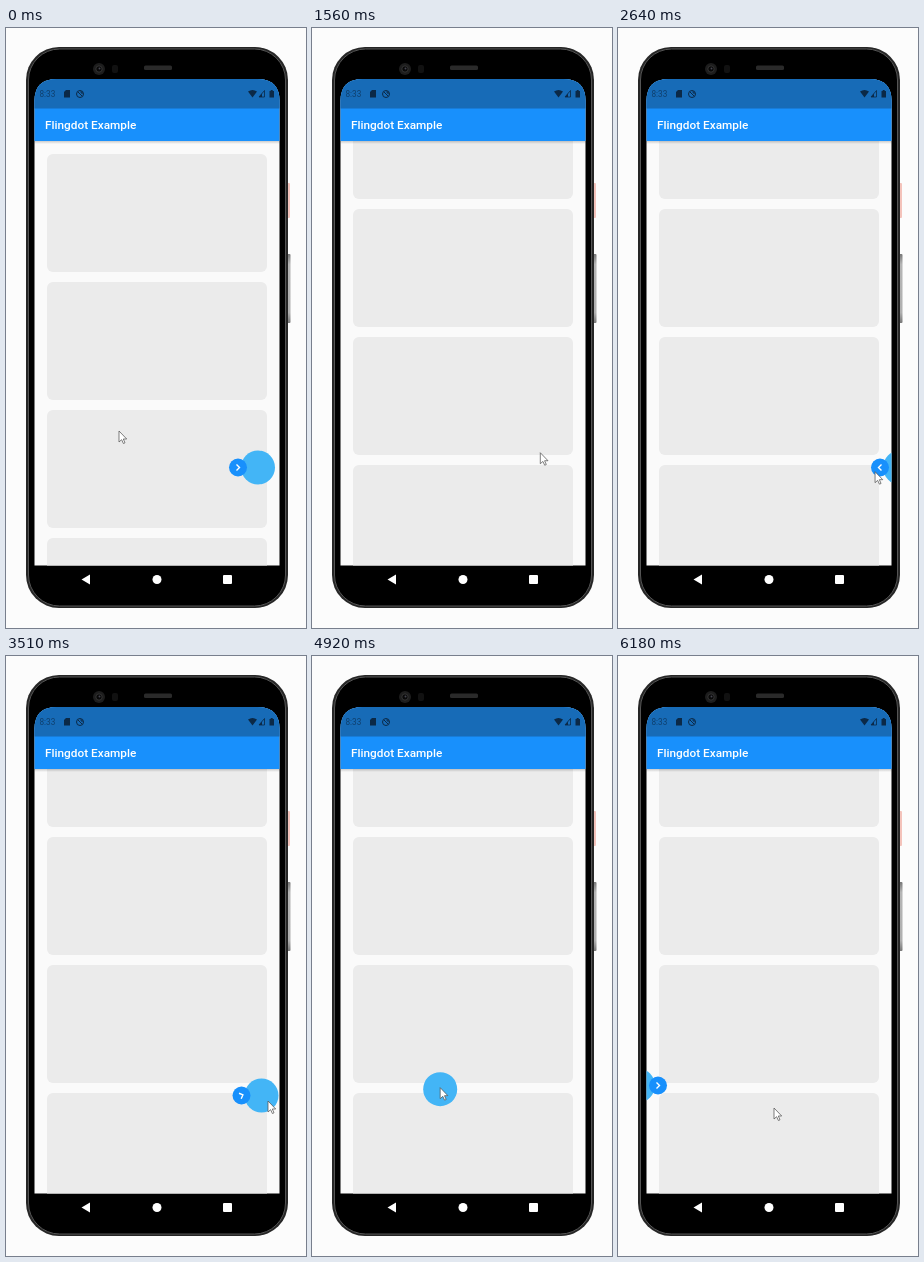
An HTML page for the animation above (6270 ms loop, 300x600 px).

```html
<!DOCTYPE html>
<html lang="en">
<head>
<meta charset="utf-8">
<title>Draggable ball demo</title>
<style>
html, body { margin: 0; width: 100%; height: 100%; overflow: hidden; background: #fcfcfc; }
svg { display: block; width: 300px; height: 600px; }
text { font-family: Roboto, "Open Sans", sans-serif; }
</style>
</head>
<body>
<svg viewBox="0 0 300 600">
  <defs>
    <clipPath id="screen"><path d="M28.500 537.500V73Q28.500 51 51 51H251Q273.500 51 273.500 73V537.500Z"/></clipPath>
    <linearGradient id="shade" x2="0" y2="1">
      <stop offset="0" stop-color="#000" stop-opacity=".22"/>
      <stop offset="1" stop-color="#000" stop-opacity="0"/>
    </linearGradient>
    <linearGradient id="volume" x2="0" y2="1">
      <stop offset="0" stop-color="#777"/>
      <stop offset=".15" stop-color="#b5b5b5"/>
      <stop offset=".85" stop-color="#b0b0b0"/>
      <stop offset="1" stop-color="#777"/>
    </linearGradient>
  </defs>

  <!-- phone body -->
  <rect x="280" y="155" width="4" height="35" rx="1" fill="#f4c3bb"/>
  <rect x="280" y="226" width="4.5" height="69" rx="1" fill="url(#volume)"/>
  <rect x="20" y="19" width="262" height="561" rx="33" fill="#262626"/>
  <rect x="22.5" y="21" width="257" height="557" rx="31" fill="#000" stroke="#555"/>
  <rect x="138" y="37.5" width="28" height="4.5" rx="1.5" fill="#2a2a2a"/>
  <circle cx="93" cy="41" r="6" fill="#1d1d1d"/>
  <circle cx="93" cy="41" r="3.2" fill="#090909" stroke="#343434"/>
  <circle cx="93.5" cy="40.5" r="1" fill="#454550"/>
  <rect x="106" y="37" width="6" height="8" rx="2" fill="#111"/>

  <g clip-path="url(#screen)">
    <rect x="28" y="51" width="246" height="487" fill="#fafafa"/>
    <g id="cards" fill="#ebebeb"></g>
    <rect x="28" y="112.5" width="246" height="3.5" fill="url(#shade)"/>
    <rect x="28" y="51" width="246" height="62" fill="#1890fc"/>
    <rect x="28" y="51" width="246" height="29.500" fill="#176bb7"/>
    <text x="39" y="101" font-size="11.8" font-weight="500" fill="#fff">Flingdot Example</text>

    <!-- status icons -->
    <g fill="#0b2947">
      <text x="33.5" y="69" font-size="8.2" fill="#0f3f6d">8:33</text>
      <path d="M60 62H64V69.5H58V64Z"/>
      <circle cx="74" cy="66" r="3.5" fill="none" stroke="#0b2947"/>
      <path d="M72 64L76 68M74.3 64H76V66" fill="none" stroke="#0b2947"/>
      <path d="M242 63.5Q246.500 60.500 251 63.500L246.500 69.500Z"/>
      <path d="M253 69H258.500V62.500Z" fill="none" stroke="#0b2947" stroke-width=".8"/>
      <path d="M253 69H256V65.500Z"/>
      <path d="M263.500 63H264.700V62H266.700V63H268V69.500H263.500Z"/>
    </g>

    <g id="ball">
      <circle r="17" fill="#43b5f6"/>
      <g id="button">
        <circle r="9" fill="#1890fc"/>
        <path id="chevron" d="M-1.500 -3L1.500 0L-1.500 3" fill="none" stroke="#fff" stroke-width="1.400"/>
      </g>
    </g>
  </g>

  <!-- navigation bar -->
  <g fill="#fff">
    <path d="M84 546.500V556.500L75.500 551.500Z"/>
    <circle cx="151" cy="551.500" r="4.500"/>
    <rect x="217" y="547" width="9" height="9" rx="1"/>
  </g>

  <path id="cursor" d="M0 0V11L2.600 8.700L4.400 12.500L6 11.800L4.300 8H7.700Z" fill="#fff" stroke="#555" stroke-width=".75" stroke-linejoin="round"/>
</svg>
<script>
const LOOP = 6270;
const el = id => document.getElementById(id);
const place = (node, value) => node.setAttribute('transform', value);

const smooth = u => u * u * (3 - 2 * u);
const easeOut = u => 1 - (1 - u) ** 3;
const glide = (t, from, to, ease = smooth) =>
  ease(Math.min(1, Math.max(0, (t - from) / (to - from))));

// Position after a chain of moves, each { from, to, x, y, ease }.
const follow = (t, x, y, moves) => moves.reduce((p, m) => {
  const k = glide(t, m.from, m.to, m.ease);
  return { x: p.x + (m.x - p.x) * k, y: p.y + (m.y - p.y) * k };
}, { x, y });

const swipe = { from: 445, to: 830 };
const drags = [
  { from: 3900, to: 4260, x: 141, y: 432 },
  { from: 4800, to: 5250, x: 69, y: 430 }
];
const cursorMoves = [
  { ...swipe, x: 157, y: 188 },
  { from: 1200, to: 1770, x: 232, y: 437, ease: easeOut },
  { from: 2370, to: 2970, x: 262, y: 445, ease: easeOut },
  { from: 3570, to: 3870, x: 252, y: 438 },
  ...drags,
  { from: 5880, to: 6180, x: 156, y: 452 }
];
// The ball hangs just below the pointer, then snaps to the left side.
const GRIP = 1.5;
const ballMoves = [
  ...drags.map(m => ({ ...m, y: m.y + GRIP })),
  { from: 5250, to: 5400, x: 50, y: 429.5, ease: easeOut }
];

for (let i = 0; i < 6; i++) {
  el('cards').insertAdjacentHTML('beforeend',
    `<rect x="41" y="${126 + 128 * i}" width="220" height="118" rx="6"/>`);
}

function draw(t) {
  const onLeft = t > 4500;
  const tuckRight = glide(t, 2400, 2620);
  const untuck = glide(t, 3330, 3560);
  const tuckLeft = glide(t, 5900, 6150);

  const cursor = follow(t, 113, 403, cursorMoves);
  const ball = follow(t, 252, 439.5, ballMoves);
  const ballX = ball.x + 30 * (tuckRight - untuck - tuckLeft);
  const ballSize = 1 - glide(t, 570, 780) + glide(t, 1890, 2200);
  const buttonSize = 1 - glide(t, 3900, 4000) + glide(t, 5430, 5570);
  const turns = tuckRight + untuck + tuckLeft + (onLeft ? 1 : 0);

  place(el('cards'), `translate(0 ${-201 * glide(t, swipe.from, swipe.to)})`);
  place(el('ball'), `translate(${ballX} ${ball.y}) scale(${ballSize})`);
  place(el('button'), `translate(${onLeft ? 20 : -20} 0) scale(${buttonSize})`);
  place(el('chevron'), `rotate(${180 * turns})`);
  place(el('cursor'), `translate(${cursor.x} ${cursor.y})`);
}

const start = performance.now();
function tick() {
  draw((performance.now() - start) % LOOP);
  requestAnimationFrame(tick);
}
tick();
</script>
</body>
</html>
```
